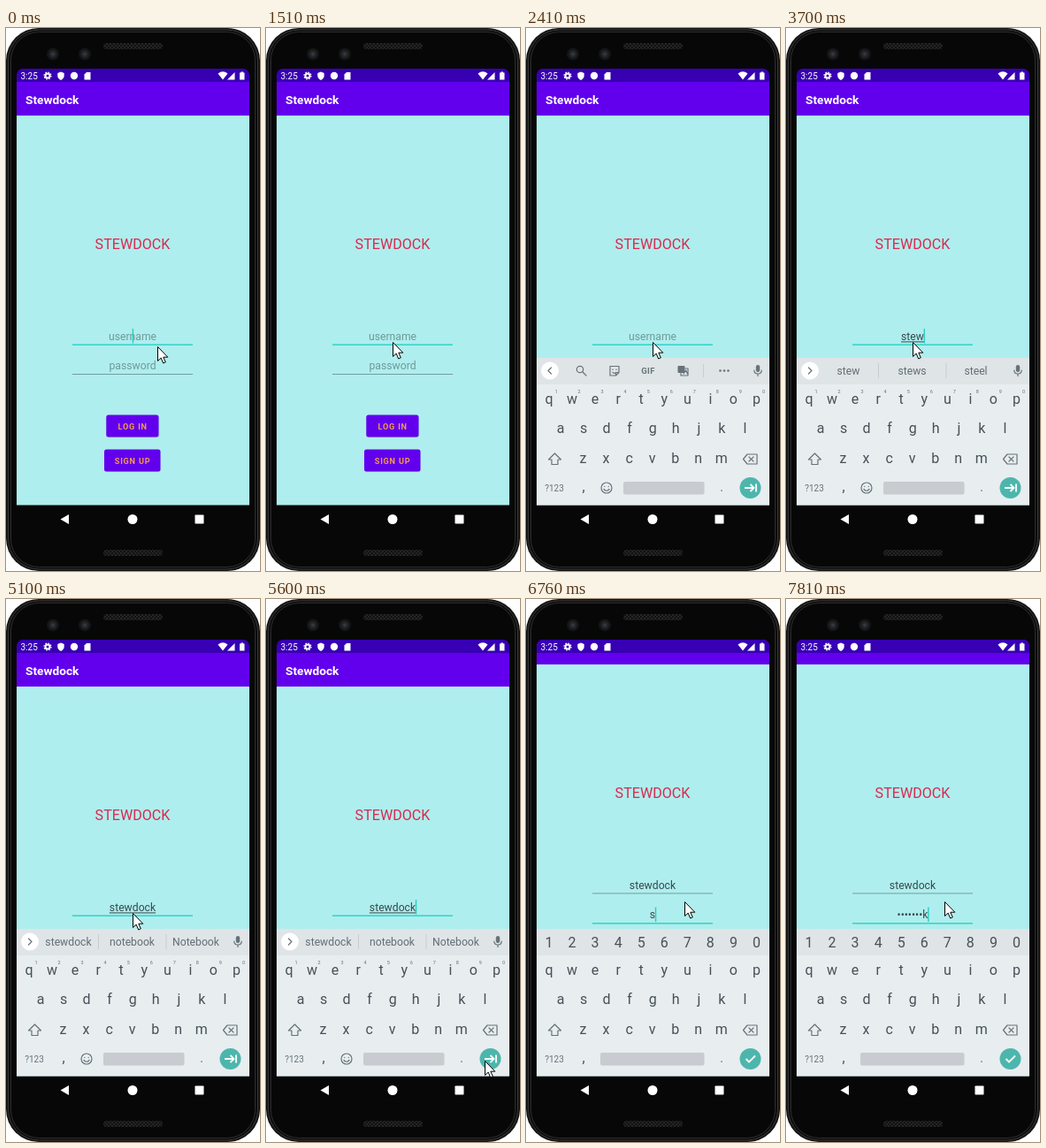
These frames come from a looping animation (287x614 px, 8 s). An HTML page:

```html
<!DOCTYPE html>
<html lang="en">
<head>
<meta charset="utf-8">
<title>Login demo</title>
<style>
html, body { margin: 0; width: 100%; height: 100%; overflow: hidden; background: #fff; }
svg { display: block; width: 287px; height: 614px; font-family: Roboto, sans-serif; }
.mid { text-anchor: middle; }
.icon { fill: none; stroke: #677379; stroke-width: 1.2; stroke-linejoin: round; stroke-linecap: round; }
.key { font-size: 16px; fill: #465158; text-anchor: middle; }
.sup { font-size: 5.5px; fill: #65727a; text-anchor: middle; }
.field { font-size: 12.2px; text-anchor: middle; }
.word { font-size: 12.2px; fill: #626e75; text-anchor: middle; }
.button { font-size: 9.1px; font-weight: 700; letter-spacing: .8px; fill: #f59a4c; text-anchor: middle; }
</style>
</head>
<body>
<svg id="stage" viewBox="0 0 287 614"></svg>
<script>
const LOOP = 8000;
const NAME = 'Stewdock';
const TYPED = NAME.toLowerCase();
const HINT = 'rgba(0,0,0,.36)';
const INK = '#37474b';
const BEZEL = '#070707';

// Step tables: [start ms, ...values]
const pointer = [
  [0, 171, 360], [150, 154, 361], [270, 144, 357], [830, 143, 356], [980, 143, 355],
  [5220, 160, 385], [5350, 203, 448], [5470, 239, 506], [5600, 247, 522],
  [6000, 247, 491], [6120, 207, 398], [6240, 179, 343], [6390, 179, 342]
];
const caretOn = [
  [0, 1], [550, 0], [980, 1], [1510, 0], [2030, 1], [2150, 0], [2930, 1],
  [5100, 0], [5600, 1], [6240, 0], [6760, 1]
];
const userLength = [
  [0, 0], [3180, 1], [3430, 2], [3580, 3], [3700, 4], [4070, 5], [4190, 6], [4440, 7], [4700, 8]
];
const passLength = [
  [0, 0], [6760, 1], [7010, 3], [7130, 4], [7380, 5], [7660, 7], [7810, 8]
];
const keyboardStep = [[0, 0, 0], [2290, .65, 31], [2410, 1, 0]];
const panStep = [[0, 0], [5880, 12], [6000, 25]];
const PASSWORD_AT = 5880;

// Middle and right suggestion for each typed length
const suggestions = [
  ['', ''], ['so', 'see'], ['still', 'start'], ['step', 'steel'], ['stews', 'steel'],
  ['stewed', 'steward'], ['stewed', 'notebook'], ['Notebook', 'notebook'], ['notebook', 'Notebook']
];

const text = (x, y, str, attrs = '') => `<text x="${x}" y="${y}" ${attrs}>${str}</text>`;
const rect = (x, y, w, h, fill, attrs = '') =>
  `<rect x="${x}" y="${y}" width="${w}" height="${h}" fill="${fill}" ${attrs}/>`;
const circle = (x, y, r, fill, attrs = '') =>
  `<circle cx="${x}" cy="${y}" r="${r}" fill="${fill}" ${attrs}/>`;
const path = (d, attrs = 'class="icon"') => `<path d="${d}" ${attrs}/>`;
const keyRow = (chars, x, y) =>
  [...chars].map((c, i) => text(x + i * 26.05, y, c, 'class="key"')).join('');

const grille = y => rect(110, y, 67, 7, 'url(#mesh)', 'rx="3.5"');
const lens = x => circle(x, 29.5, 7, '#141517') + circle(x, 29.5, 4.5, '#222428') + circle(x, 29.5, 2, '#34373d');

const phone = `
  ${rect(0, 0, 287, 614, '#141414', 'rx="37"')}
  ${rect(2.5, 2, 282, 610, '#0c0c0c', 'rx="35" stroke="#383838"')}
  ${rect(5.5, 4.5, 276, 605, BEZEL, 'rx="32" stroke="#2e2e2e"')}
  ${lens(53)}${lens(89)}${grille(17)}${grille(590)}`;

const statusBar = `
  ${rect(12, 46, 263, 15, '#3700b3')}
  <g fill="#fff">
    ${text(16.5, 57.5, '3:25', 'font-size="10"')}
    ${circle(47, 54, 2.5, 'none', 'stroke="#fff" stroke-width="2"')}
    ${circle(47, 54, 4, 'none', 'stroke="#fff" stroke-width="1.2" stroke-dasharray="1.6 1.54"')}
    ${path('M62 49.5l3.7 1.5v3q0 3-3.7 5-3.7-2-3.7-5v-3z', '')}
    ${circle(77, 54, 4.2, '#fff')}
    ${path('M91 50h4.5v8.5h-7v-6z', '')}
    ${path('M239.5 51.5q5.5-4.5 11 0l-5.5 7z', '')}
    ${path('M258.5 50v8.5h-8.5z', '')}
    ${path('M265.5 49.5h2.5v1h1.5v8h-5.5v-8h1.5z', '')}
  </g>`;

const button = (x, y, w, label) =>
  rect(x, y + .5, w, 25, 'rgba(0,0,0,.12)', 'rx="3"') +
  rect(x, y, w, 24.8, '#6200ee', 'rx="2.5"') +
  text(x + w / 2 + .3, y + 16, label, 'class="button"');

const page = `
  <g id="page">
    ${rect(12, 61, 263, 38, '#6200ee')}
    ${text(22, 86, NAME, 'font-size="13.7" font-weight="700" fill="#fff"')}
    ${text(143, 250, NAME.toUpperCase(), 'class="mid" font-size="16.1" fill="#da2a4e"')}
    <rect id="userLine" x="75" width="136"/>
    <rect id="passLine" x="75" width="136"/>
    <text id="user" class="field" x="143" y="353"></text>
    <text id="pass" class="field" x="143" y="386"></text>
    <rect id="compose" y="354.4" height="1" fill="${INK}"/>
    <rect id="caret" width="1.4" height="16.5" fill="#2cccbf"/>
    ${button(113.3, 437.6, 59.2, 'LOG IN')}
    ${button(111, 476.6, 63.5, 'SIGN UP')}
  </g>`;

const navIcons = `
  ${path('M61.5 555.5l9.5-5.5v11z', 'fill="#fff"')}
  ${circle(143, 555.5, 5.5, '#fff')}
  ${rect(213.5, 550.5, 10, 10, '#fff', 'rx=".8"')}`;

const mic = rect(259.8, 381, 4.4, 8, '#677379', 'rx="2.2"') +
  path('M257.8 387q0 4 4.2 4t4.2-4M262 391v2.5');

const tools = `
  ${circle(27, 387.5, 10, '#fff')}
  ${path('M28.5 384l-3.5 3.5 3.5 3.5')}
  ${circle(61, 386, 3.7, 'none', 'class="icon"')}${path('M64 389l4 4')}
  ${path('M95 382.5h10v7l-3.5 3.5h-6.5zM105 389.5h-3.5v3.5M98 386v.5M102 386v.5M98 389.5q2 1.5 4 0')}
  ${text(138, 391, 'GIF', 'class="mid" font-size="9.5" font-weight="700" fill="#677379" letter-spacing=".3"')}
  ${rect(171.5, 382, 8, 8, '#677379', 'rx="1"')}
  ${path('M180 385h3v8h-8v-2.5M178 391l2.5-4 2 4')}
  ${rect(200, 380, 1, 15, '#c7cdd1')}
  ${[219.5, 224, 228.5].map(x => circle(x, 387.5, 1.3, '#677379')).join('')}`;

const wordBar = `
  ${circle(27, 387.5, 10, '#fff')}
  ${path('M25.5 384l3.5 3.5-3.5 3.5')}
  ${[104, 180.5].map(x => rect(x, 379, 1, 17, '#c7cdd1')).join('')}
  ${[70.5, 142.5, 214.5].map(x => text(x, 392, '', 'class="word"')).join('')}`;

const keyboard = `
  <g id="keyboard">
    ${rect(12, 373, 263, 166.5, '#e8edf0')}
    ${rect(12, 373, 263, 30, '#dfe4e7')}
    <g id="textTop">
      <g id="tools">${tools}</g>
      <g id="words">${wordBar}</g>
      ${mic}
      ${[...'1234567890'].map((d, i) => text(34 + i * 26.05, 413, d, 'class="sup"')).join('')}
      ${circle(91, 520, 6, 'none', 'class="icon"')}
      ${path('M88.8 518.3v.3M93.2 518.3v.3M88 521.5q3 3.5 6 0')}
      ${rect(110, 513, 91.5, 14.5, '#c8ccd0', 'rx="2"')}
    </g>
    <g id="digitTop">
      ${keyRow('1234567890', 26, 393.5)}
      ${rect(84, 513, 117.5, 14.5, '#c8ccd0', 'rx="2"')}
    </g>
    ${keyRow('qwertyuiop', 26, 424.5)}
    ${keyRow('asdfghjkl', 39, 458)}
    ${keyRow('zxcvbnm', 64.5, 491.5)}
    ${path('M32.5 481l7 7h-3.5v5.5h-7v-5.5h-3.5z')}
    ${path('M250 482h11v11h-11l-4.5-5.5zM252 485l5 5M257 485l-5 5')}
    ${text(32, 524, '?123', 'class="mid" font-size="10" fill="#677379"')}
    ${text(65, 524, ',', 'class="key"')}
    ${text(221, 524, '.', 'class="key" style="fill:#7c878d"')}
    ${circle(253.5, 520, 12, '#4db6ac')}
    <path id="enter" fill="none" stroke="#fff" stroke-width="1.8"/>
  </g>`;

const stage = document.getElementById('stage');
stage.innerHTML = `
  <defs>
    <clipPath id="screen"><rect x="12" y="46" width="263" height="524.5" rx="7"/></clipPath>
    <pattern id="mesh" width="4" height="4" patternUnits="userSpaceOnUse">
      <rect width="4" height="4" fill="#121212"/>
      <path d="M0 0l4 4M4 0l-4 4" stroke="#2a2a2a" stroke-width=".8"/>
    </pattern>
  </defs>
  ${phone}
  <g clip-path="url(#screen)">
    ${rect(12, 61, 263, 479, '#afeeee')}
    ${page}
    ${rect(12, 539.5, 263, 31.5, BEZEL)}
    ${statusBar}
    ${keyboard}
    ${navIcons}
  </g>
  <path id="pointer" d="M.5.5v16l3.7-3.4 2.5 5.9 2.6-1.1-2.5-5.7h5z" fill="#fff" stroke="#000"/>`;

const el = Object.fromEntries([...stage.querySelectorAll('[id]')].map(n => [n.id, n]));
const wordSlots = [...el.words.querySelectorAll('text')];

const at = (steps, t) => steps.findLast(s => s[0] <= t).slice(1);
const set = (node, attrs) => Object.entries(attrs).forEach(([k, v]) => node.setAttribute(k, v));
const show = (node, on) => { node.style.display = on ? '' : 'none'; };

function setField(node, value, hint) {
  node.textContent = value || hint;
  node.setAttribute('fill', value ? INK : HINT);
  return value ? node.getComputedTextLength() : 0;
}

function setLine(node, y, focused) {
  set(node, focused
    ? { y, height: 1.5, fill: '#2fd5c8' }
    : { y, height: 1, fill: 'rgba(0,0,0,.34)' });
}

function render(t) {
  const [x, y] = at(pointer, t);
  const [opacity, slide] = at(keyboardStep, t);
  const [pan] = at(panStep, t);
  const [count] = at(userLength, t);
  const [passCount] = at(passLength, t);
  const onPassword = t >= PASSWORD_AT;

  set(el.pointer, { transform: `translate(${x} ${y})` });
  set(el.page, { transform: `translate(0 ${-pan})` });
  set(el.keyboard, { opacity, transform: `translate(0 ${slide})` });

  const secret = passCount ? '•'.repeat(passCount - 1) + TYPED[passCount - 1] : '';
  const userWidth = setField(el.user, TYPED.slice(0, count), 'username');
  const passWidth = setField(el.pass, secret, 'password');
  setLine(el.userLine, 357.4, !onPassword);
  setLine(el.passLine, 391, onPassword);

  set(el.compose, { x: 143 - userWidth / 2, width: userWidth });
  show(el.compose, count && !onPassword);
  const width = onPassword ? passWidth : userWidth;
  set(el.caret, { x: 142.7 + width / 2, y: onPassword ? 373.5 : 340 });
  show(el.caret, at(caretOn, t)[0]);

  show(el.textTop, !onPassword);
  show(el.digitTop, onPassword);
  show(el.tools, !count);
  show(el.words, count);
  [TYPED.slice(0, count), ...suggestions[count]].forEach((w, i) => { wordSlots[i].textContent = w; });
  set(el.enter, { d: onPassword
    ? 'M248.5 520l3.5 3.5 7-7'
    : 'M247 520h10M253.5 516l4 4-4 4M260 515.5v9' });
}

const start = performance.now();
function tick() {
  render((performance.now() - start) % LOOP);
  requestAnimationFrame(tick);
}
tick();
</script>
</body>
</html>
```
